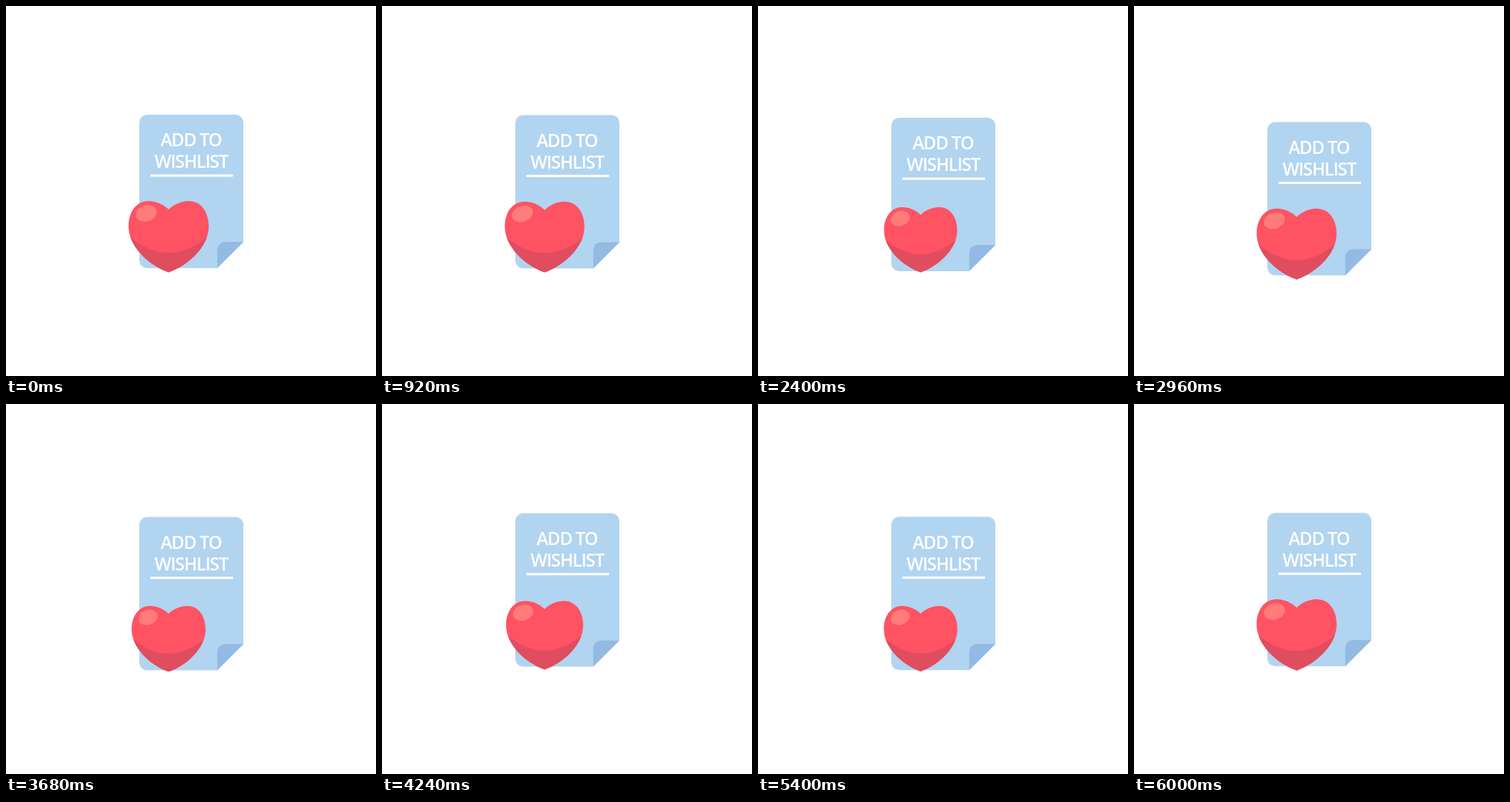
Recreate the animation shown at these times as an HTML page. Size 480x480 px, loop 6040 ms.

```html
<!DOCTYPE html>
<html lang="en">
<head>
<meta charset="utf-8">
<title>Add to wishlist</title>
<style>
  html, body { margin: 0; width: 100%; height: 100%; overflow: hidden; background: #fff; }
  svg { display: block; width: 100vw; height: 100vh; }
  text { font: 600 23px "Open Sans", sans-serif; letter-spacing: -1.1px; text-anchor: middle; fill: #fff; }
</style>
</head>
<body>
<svg viewBox="0 0 480 480">
  <defs>
    <path id="shape" d="M0-35C7-42 17-46 26-46C42-46 52-32 52-13C52 12 27 37 0 46.5C-27 37-52 12-52-13C-52-32-42-46-26-46C-17-46-7-42 0-35Z"/>
    <clipPath id="inside"><use href="#shape"/></clipPath>
  </defs>
  <g id="card">
    <path fill="#b1d4f0" d="M183 141H298A10 10 0 0 1 308 151V306L274 340H183A10 10 0 0 1 173 330V151A10 10 0 0 1 183 141Z"/>
    <path fill="#92bae3" d="M308 306L274 340V316A10 10 0 0 1 284 306Z"/>
    <text x="240" y="182.3">ADD TO</text>
    <text x="240.3" y="210.3">WISHLIST</text>
    <rect x="187.5" y="218.5" width="107" height="3" fill="#fff"/>
    <g id="heart">
      <use href="#shape" fill="#ff5263"/>
      <path clip-path="url(#inside)" fill="#df4d5f" d="M-52-1Q0 43.5 52-1V50H-52Z"/>
      <ellipse cx="-29" cy="-30" rx="14" ry="10.5" transform="rotate(-18 -29 -30)" fill="#ff7c78"/>
    </g>
  </g>
</svg>
<script>
  const LOOP = 6040, STEP = 40;
  const card = document.getElementById("card");
  const heart = document.getElementById("heart");

  // Goes smoothly 0 -> 1 -> 0, the given number of times per loop.
  const wave = (t, cycles) => (1 - Math.cos(2 * Math.PI * cycles * t / LOOP)) / 2;

  function draw() {
    const t = Math.floor(performance.now() % LOOP / STEP) * STEP;
    card.setAttribute("transform", `translate(0 ${10 * wave(t, 7)})`);
    heart.setAttribute("transform", `translate(211 299) scale(${1 - 0.1 * wave(t, 6)})`);
    requestAnimationFrame(draw);
  }
  draw();
</script>
</body>
</html>
```
